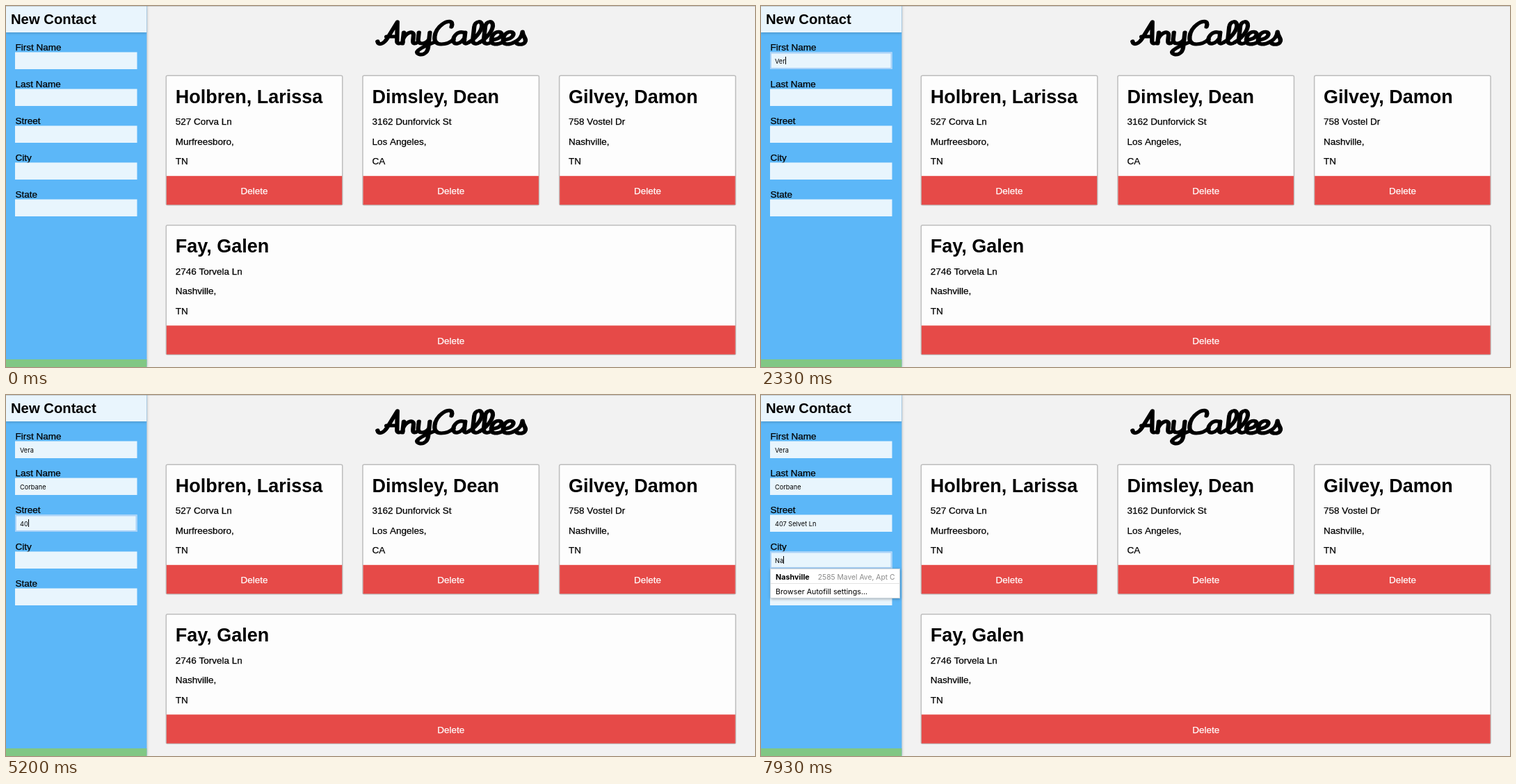
An HTML page with a canvas that plays this animation: 1077x520 px, repeating every 8 s.

```html
<!DOCTYPE html>
<html lang="en">
<head>
<meta charset="utf-8">
<title>AnyCallees</title>
<style>
  html, body { margin: 0; width: 100%; height: 100%; overflow: hidden; background: #f2f2f2; }
  canvas { display: block; width: 100vw; height: 100vh; }
</style>
</head>
<body>
<canvas id="stage" width="1077" height="520" aria-label="AnyCallees contact list"></canvas>
<script>
const ctx = document.getElementById('stage').getContext('2d');
const LOOP = 8000;
const PAGE_FONT = '"Liberation Sans", Arial, sans-serif';
const UI_FONT = 'Inter, Roboto, sans-serif';
const BLINK = 500;

// focus: when the field is entered; keys: when each character lands
const fields = [
  { label: 'First Name', text: 'Vera', focus: 980, keys: [1900, 2060, 2200, 2360] },
  { label: 'Last Name', text: 'Corbane', focus: 2740,
    keys: [2930, 3080, 3240, 3480, 3640, 3820, 4010] },
  { label: 'Street', text: '407 Selvet Ln', focus: 4560,
    keys: [4880, 5080, 5300, 5480, 5620, 5740, 5850, 5960, 6080, 6220, 6560, 6740, 6900] },
  { label: 'City', text: 'Na', focus: 7120, keys: [7600, 7860] },
  { label: 'State', text: '', focus: Infinity, keys: [] }
];

const cards = [
  { x: 229.5, y: 99.5, w: 255, name: 'Holbren, Larissa', lines: ['527 Corva Ln', 'Murfreesboro,', 'TN'] },
  { x: 512.2, y: 99.5, w: 255, name: 'Dimsley, Dean', lines: ['3162 Dunforvick St', 'Los Angeles,', 'CA'] },
  { x: 794.9, y: 99.5, w: 255, name: 'Gilvey, Damon', lines: ['758 Vostel Dr', 'Nashville,', 'TN'] },
  { x: 229.5, y: 315, w: 820.5, name: 'Fay, Galen', lines: ['2746 Torvela Ln', 'Nashville,', 'TN'] }
];

// Brush-script letters: advance width and pen path, baseline at y = 0
const script = {
  A: [28, 'M-2 -6C0 1 6 -3 9 -10L19 -34L21 -8C21 -2 25 -2 28 -5M8 -13L20 -13'],
  n: [18, 'M0 -19L0 -3M0 -9C2 -18 11 -23 12 -15L12 -8C12 -2 15 -2 18 -5'],
  y: [20, 'M0 -19L0 -9C0 -1 9 -1 13 -9M13 -19L13 2C13 13 5 15 1 11C-2 7 8 1 20 -5'],
  C: [22, 'M18 -27C20 -37 12 -36 7 -31C-3 -22 -4 -2 8 -2C15 -2 19 -5 22 -9'],
  a: [19, 'M13 -18C4 -23 -1 -13 0 -7C1 0 9 -2 13 -11M13 -19L13 -7C13 -2 16 -2 19 -5'],
  l: [13, 'M0 -5C6 -9 13 -20 13 -28C13 -37 4 -36 4 -27L4 -9C4 -2 9 -1 13 -5'],
  e: [14, 'M0 -8C9 -9 13 -14 11 -18C8 -22 0 -19 0 -9C0 0 8 -1 14 -5'],
  s: [14, 'M0 -5C5 -8 8 -14 8 -20C9 -13 15 -9 12 -4C10 -1 4 -1 2 -4']
};

function rect(x, y, w, h, color) {
  ctx.fillStyle = color;
  ctx.fillRect(x, y, w, h);
}

function text(str, x, y, size, { color = '#000', weight = 'normal', align = 'left', font = PAGE_FONT } = {}) {
  ctx.font = `${weight} ${size}px ${font}`;
  ctx.fillStyle = ctx.strokeStyle = color;
  ctx.textAlign = align;
  ctx.fillText(str, x, y);
  // A hairline outline gives the heavier look of smoothed page text
  if (font === PAGE_FONT && weight === 'normal') {
    ctx.lineWidth = 0.25;
    ctx.strokeText(str, x, y);
  }
}

function withShadow(color, blur, dy, draw) {
  ctx.save();
  ctx.shadowColor = color;
  ctx.shadowBlur = blur;
  ctx.shadowOffsetY = dy;
  draw();
  ctx.restore();
}

function drawTitle() {
  ctx.save();
  ctx.transform(1.21, 0, -0.11, 1, 536, 57);
  ctx.lineWidth = 5.2;
  ctx.lineCap = ctx.lineJoin = 'round';
  ctx.strokeStyle = '#000';
  for (const ch of 'AnyCallees') {
    const [advance, path] = script[ch];
    ctx.stroke(new Path2D(path));
    ctx.translate(advance, 0);
  }
  ctx.restore();
}

function drawCard({ x, y, w, name, lines }) {
  ctx.beginPath();
  ctx.roundRect(x + 0.75, y + 0.75, w - 1.5, 186.5, 2);
  ctx.fillStyle = '#fdfdfd';
  ctx.fill();
  ctx.strokeStyle = '#bdbdbd';
  ctx.lineWidth = 1.5;
  ctx.stroke();
  rect(x + 1.3, y + 145.3, w - 2.6, 41.5, '#e64a48');
  text(name, x + 14.2, y + 40, 27, { weight: 'bold' });
  lines.forEach((line, i) => text(line, x + 14.2, y + 71.5 + i * 28.5, 13.5));
  text('Delete', x + w / 2, y + 171.7, 13.5, { color: '#fff', align: 'center' });
}

function drawField(field, i, t) {
  const y = 66.5 + i * 53;
  const next = fields[i + 1];
  const focused = t >= field.focus && !(next && t >= next.focus);
  const count = field.keys.filter(k => k <= t).length;
  const typed = field.text.slice(0, count);

  text(field.label, 13.5, y - 2.8, 13.5);
  rect(13, y, 175.5, 24.5, '#e8f5fd');
  if (focused) {
    ctx.strokeStyle = '#a9d2f8';
    ctx.lineWidth = 2;
    ctx.strokeRect(14, y + 1, 173.5, 22.5);
  }
  text(typed, 20, y + 16, 9.2, { font: UI_FONT });
  if (focused) {
    const last = count ? field.keys[count - 1] : field.focus;
    const lit = Math.floor((t - last) / BLINK) % 2 === 0;
    if (lit) rect(20 + Math.round(ctx.measureText(typed).width), y + 6.5, 1, 11, '#000');
  }
}

function drawSidebar(t) {
  withShadow('rgba(0,0,0,.4)', 5, 0, () => rect(0, 0, 202.4, 520, '#5cb7f8'));
  rect(0, 509, 202.4, 11, '#81c784');
  ctx.save();
  ctx.beginPath();
  ctx.rect(0, 0, 202.4, 60);
  ctx.clip();
  withShadow('rgba(0,0,0,.22)', 4, 1, () => rect(0, 0, 202.4, 38, '#e9f5fd'));
  ctx.restore();
  text('New Contact', 7, 26, 20.25, { weight: 'bold' });
  fields.forEach((field, i) => drawField(field, i, t));
}

function drawAutofill() {
  withShadow('rgba(0,0,0,.3)', 4, 1, () => rect(14, 250, 185.5, 42.5, '#fff'));
  ctx.strokeStyle = '#c9d3da';
  ctx.lineWidth = 1;
  ctx.strokeRect(13.5, 250.5, 186, 42);
  rect(14, 271, 185.5, 1, '#e2e2e2');
  text('Nashville', 21, 265.5, 10.8, { weight: 'bold', font: UI_FONT });
  text('2585 Mavel Ave, Apt C', 192.5, 265.5, 10.3, { color: '#8a8a8a', align: 'right', font: UI_FONT });
  text('Browser Autofill settings...', 21, 286.5, 10.7, { font: UI_FONT });
}

function drawPointer(t) {
  const p = Math.min(1, Math.max(0, (t - 300) / 560));
  const ease = 1 - (1 - p) ** 3;
  ctx.save();
  ctx.translate(60 - 27 * ease, -20 + 99 * ease);
  const arrow = new Path2D('M0 0L0 11.2L2.6 8.8L4.4 12.8L6.3 12L4.6 8.1L8 8Z');
  ctx.strokeStyle = '#fff';
  ctx.lineWidth = 1.6;
  ctx.stroke(arrow);
  ctx.fillStyle = '#000';
  ctx.fill(arrow);
  ctx.restore();
}

function draw(t) {
  rect(0, 0, 1077, 520, '#f2f2f2');
  drawTitle();
  cards.forEach(drawCard);
  drawSidebar(t);
  if (t >= fields[3].keys[0]) drawAutofill();
  rect(0, 0, 1077, 1, 'rgba(0,0,0,.16)');
  if (t >= 300 && t < fields[0].keys[0]) drawPointer(t);
}

const start = performance.now();
function tick() {
  draw((performance.now() - start) % LOOP);
  requestAnimationFrame(tick);
}
tick();
</script>
</body>
</html>
```
